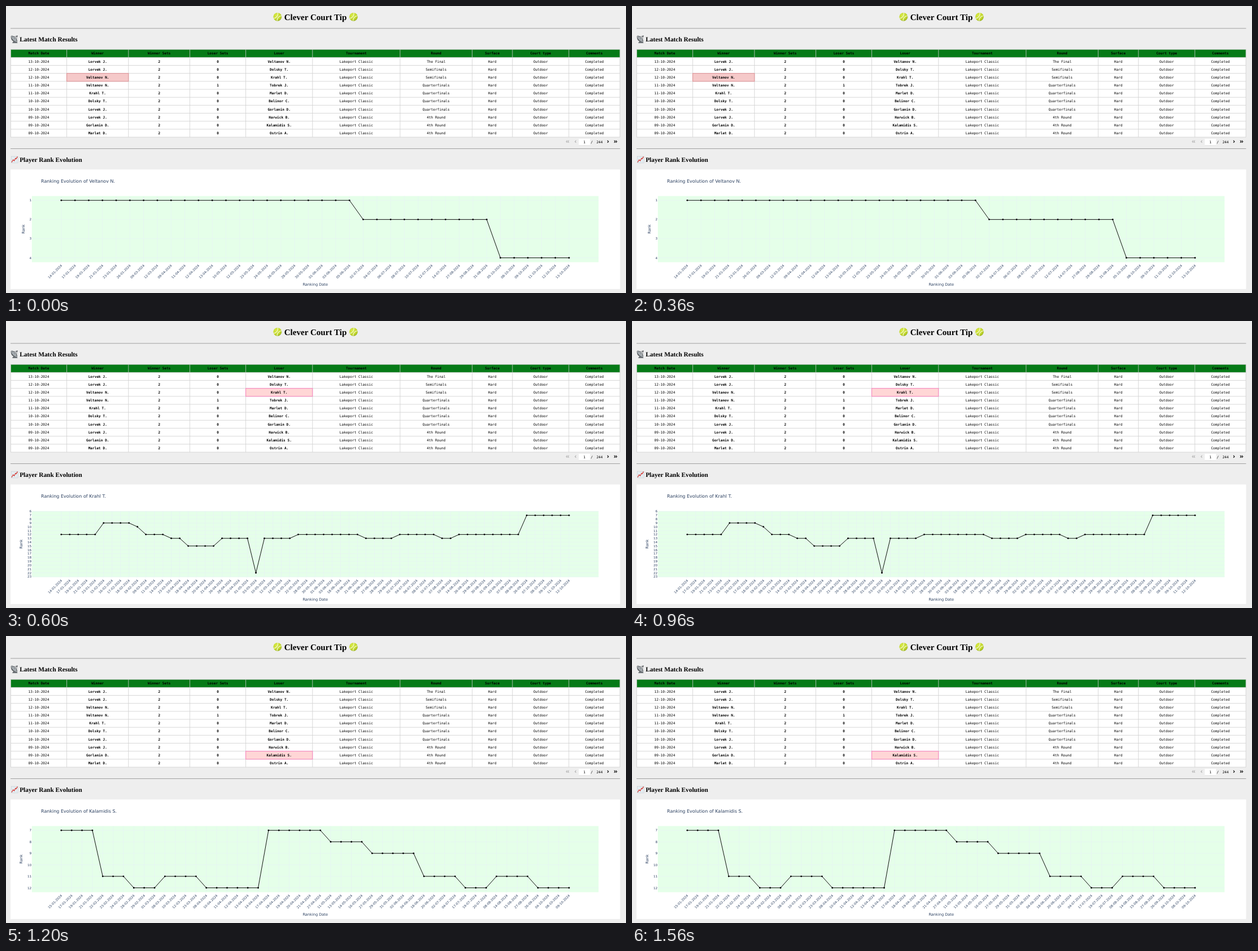
An HTML page for the animation above (1800 ms loop, 1098 px wide and 510 px high).

```html
<!DOCTYPE html>
<html lang="en">
<head>
<meta charset="utf-8">
<title>Clever Court Tip</title>
<style>
  html, body { margin: 0; width: 100%; height: 100%; overflow: hidden; background: #eee; }
  svg { display: block; width: 1098px; height: 510px; }
  text { text-rendering: geometricPrecision; white-space: pre; }
  .head { font-family: "Liberation Serif", "Times New Roman", serif; font-weight: bold; }
  .mono { font: 6.13px "DejaVu Sans Mono", Menlo, monospace; text-anchor: middle; }
  .bold { font-weight: bold; }
  .plot { font-family: "DejaVu Sans", Verdana, sans-serif; fill: #2a3f5f; }
  .view { opacity: 0; animation: show 1800ms step-end infinite; }
  .v1 { animation-delay: -1200ms; }
  .v2 { animation-delay: -600ms; }
  @keyframes show {
    0% { opacity: 1; }
    33.3333%, 100% { opacity: 0; }
  }
</style>
</head>
<body>
<svg id="stage" viewBox="0 0 1098 510" xmlns="http://www.w3.org/2000/svg">
  <defs>
    <radialGradient id="felt" cx=".4" cy=".35" r=".7">
      <stop offset="0" stop-color="#dcec4e"/>
      <stop offset=".7" stop-color="#bfd52c"/>
      <stop offset="1" stop-color="#93ab1c"/>
    </radialGradient>
    <g id="ball">
      <circle r="7.4" fill="url(#felt)"/>
      <path d="M-6.9 2.4C-2.6 2.6 1.4-1.6 .6-7.2M-.8 7.2C-1 2.6 2.4-1.6 7.1-1.8" fill="none" stroke="#f5f8dc" stroke-width="1.1"/>
    </g>
  </defs>
  <rect width="1098" height="510" fill="#eee"/>

  <use href="#ball" x="480.8" y="19.3"/>
  <use href="#ball" x="615.4" y="19.3"/>
  <text class="head" x="548" y="24.7" font-size="15.1" text-anchor="middle">Clever Court Tip</text>
  <path d="M8 39.8H1087.5M8 253.5H1087.5" stroke="#999" stroke-width=".9"/>

  <g>
    <path d="M14.5 60L11 66H20.5L17.5 60Z" fill="#6d7276"/>
    <path d="M9.2 53.2C7.6 58.6 11.2 64.4 19.6 63.6Z" fill="#4d5256"/>
    <ellipse cx="14.4" cy="58.4" rx="7.2" ry="2.9" transform="rotate(45 14.4 58.4)" fill="#a7adb1" stroke="#62676b" stroke-width=".6"/>
    <path d="M14.4 58.4L19.4 53.6M10.5 55L19.4 53.6L18.4 62" fill="none" stroke="#555a5e" stroke-width=".7"/>
    <circle cx="19.6" cy="53.5" r="1.1" fill="#3f4346"/>
  </g>
  <text class="head" x="24.2" y="63" font-size="11.33">Latest Match Results</text>

  <g>
    <rect x="9.4" y="267.2" width="11.6" height="11.6" fill="#fbfcfd" stroke="#b5bfc6" stroke-width=".6"/>
    <path d="M12.3 267.2V278.8M15.2 267.2V278.8M18.1 267.2V278.8M9.4 270.1H21M9.4 273H21M9.4 275.9H21" stroke="#a9cbd9" stroke-width=".5"/>
    <path d="M10 277.8L12.6 273.2L14.6 275L17 270.4L18.2 271.6L20.4 267.6" fill="none" stroke="#d8342c" stroke-width="1.2"/>
  </g>
  <text class="head" x="24.2" y="276.8" font-size="11.33">Player Rank Evolution</text>

  <g id="table"></g>

  <g class="mono">
    <rect x="1014.3" y="236" width="20" height="11.6" fill="#fff"/>
    <path d="M1014.3 247.6H1034.3" stroke="#d3d3d3" stroke-width=".5"/>
    <text x="1024.3" y="244.2">1</text>
    <text x="1037.4" y="243.6">/</text>
    <text x="1051.2" y="243.6">244</text>
    <g fill="none" stroke-width="1.1">
      <path d="M994.2 238.9L992.2 240.9L994.2 242.9M997 238.9L995 240.9L997 242.9M1009.7 238.9L1007.7 240.9L1009.7 242.9" stroke="#b0b0b0"/>
      <path d="M1065 238.9L1067 240.9L1065 242.9M1077 238.9L1079 240.9L1077 242.9M1079.8 238.9L1081.8 240.9L1079.8 242.9" stroke="#000"/>
    </g>
  </g>

  <rect x="8" y="290.5" width="1079.5" height="212.4" fill="#fff"/>
  <rect x="45.8" y="337.7" width="1003.6" height="117.6" fill="#e5ffe9"/>
  <text class="plot" x="547.7" y="496.8" font-size="6.61" text-anchor="middle">Ranking Date</text>
  <g id="charts"></g>
</svg>
<script>
const NS = 'http://www.w3.org/2000/svg';
const byId = id => document.getElementById(id);

function add(parent, tag, attrs, text) {
  const el = document.createElementNS(NS, tag);
  for (const k in attrs) el.setAttribute(k, attrs[k]);
  if (text !== undefined) el.textContent = text;
  parent.appendChild(el);
  return el;
}

// Match table
const cols = [8.4, 107.6, 216.9, 325.6, 424.6, 542.8, 697.9, 825.6, 896.9, 996.8, 1087.2];
const top0 = 77.2, rowH = 14.17;
const titles = ['Match Date', 'Winner', 'Winner Sets', 'Loser Sets', 'Loser',
  'Tournament', 'Round', 'Surface', 'Court type', 'Comments'];
const matches = [
  ['13', 'Lorvek J.', 0, 'Veltanov N.', 'The Final'],
  ['12', 'Lorvek J.', 0, 'Dolsky T.', 'Semifinals'],
  ['12', 'Veltanov N.', 0, 'Krahl T.', 'Semifinals'],
  ['11', 'Veltanov N.', 1, 'Tobrek J.', 'Quarterfinals'],
  ['11', 'Krahl T.', 0, 'Marlet D.', 'Quarterfinals'],
  ['10', 'Dolsky T.', 0, 'Belinor C.', 'Quarterfinals'],
  ['10', 'Lorvek J.', 0, 'Gorlanin D.', 'Quarterfinals'],
  ['09', 'Lorvek J.', 0, 'Harwick B.', '4th Round'],
  ['09', 'Gorlanin D.', 0, 'Kalamidis S.', '4th Round'],
  ['09', 'Marlet D.', 0, 'Ostrin A.', '4th Round']
];

// ranks: "rank*repeat"; dates: "month:days"
const views = [
  { player: 'Veltanov N.', row: 3, col: 1, fill: '#f5c9c9', edge: '#dc8f93', ticks: [1, 4], labelX: 33,
    ranks: '1*22 2*10 4*6',
    dates: '01:14,17,19,21,23,26 03:09,12 04:09,11,12,13 05:10,12,23,24,26,28,30 06:01,03,05 ' +
      '07:02,04,06,08,10,12,14 08:27,29,31 10:05,08,09,11,12,13' },
  { player: 'Krahl T.', row: 3, col: 4, fill: '#ffd6d6', edge: '#f77fbb', ticks: [6, 23], labelX: 29.2,
    ranks: '12*5 9*4 10*1 12*3 13*2 15*4 13*4 22*1 13*4 12*8 13*4 12*5 13*2 12*8 7*6',
    dates: '01:14,17,19,21,23 02:15,16,17,18,19 03:09,11,14,23 04:10,18,19,20,21,26,28,30 ' +
      '05:01,03,10,12,14,15,22,28,30 06:01,03,18,19,21,26,27,28,29 07:02,04,06,08,10 ' +
      '08:07,10,14,26,29,30 09:01,03,07,08,26 10:07,08,09,11,12' },
  { player: 'Kalamidis S.', row: 9, col: 4, fill: '#ffd6d6', edge: '#f77fbb', ticks: [7, 12], labelX: 29.2,
    ranks: '7*4 11*3 12*3 11*4 12*6 7*6 8*4 9*5 11*4 12*3 11*4 12*4',
    dates: '01:15,17,19,21 02:22,23,24,28,29 03:01,08,10,12,23 04:08,10,11,12,13,14,17,18,19,20,21,27 ' +
      '05:11,13,14,16,27,29,31 06:02,04,18,20 07:02,04,17,19,20 08:08,14,15,27 09:26 10:04,08,09' }
];

function drawTable(g) {
  const left = cols[0], right = cols[10], bottom = top0 + 11 * rowH;
  add(g, 'rect', { x: left, y: top0, width: right - left, height: bottom - top0, fill: '#fff' });
  add(g, 'rect', { x: left, y: top0, width: right - left, height: rowH, fill: '#067a17' });
  let lines = cols.map(x => `M${x} ${top0}V${bottom}`).join('');
  for (let r = 0; r < 12; r++) lines += `M${left} ${top0 + r * rowH}H${right}`;
  add(g, 'path', { d: lines, fill: 'none', stroke: '#cfcfcf', 'stroke-width': .8 });

  views.forEach((v, i) => add(g, 'rect', {
    class: 'view v' + i, x: cols[v.col], y: top0 + v.row * rowH,
    width: cols[v.col + 1] - cols[v.col], height: rowH,
    fill: v.fill, stroke: v.edge, 'stroke-width': 1
  }));

  const rows = matches.map(([day, winner, lost, loser, round]) =>
    [day + '-10-2024', winner, 2, lost, loser, 'Lakeport Classic', round, 'Hard', 'Outdoor', 'Completed']);
  [titles, ...rows].forEach((cells, r) => cells.forEach((cell, c) => {
    const bold = r === 0 || (c > 0 && c < 5);
    add(g, 'text', {
      class: bold ? 'mono bold' : 'mono',
      x: (cols[c] + cols[c + 1]) / 2, y: top0 + (r + .5) * rowH + 2.1
    }, cell);
  }));
}

function drawChart(parent, v, i) {
  const g = add(parent, 'g', { class: 'plot view v' + i });
  const ranks = v.ranks.split(' ').flatMap(run => {
    const [rank, n] = run.split('*').map(Number);
    return Array(n).fill(rank);
  });
  const dates = v.dates.split(' ').flatMap(group => {
    const [month, days] = group.split(':');
    return days.split(',').map(d => `${d}-${month}-2024`);
  });
  const lo = Math.min(...ranks), hi = Math.max(...ranks);
  const px = k => 97.9 + 899.2 * k / (ranks.length - 1);
  const py = rank => 345.3 + 102.2 * (rank - lo) / (hi - lo);

  add(g, 'text', { x: 62, y: 314, 'font-size': 8.03 }, 'Ranking Evolution of ' + v.player);
  add(g, 'text', {
    transform: `translate(${v.labelX} 396.5) rotate(-90)`, 'font-size': 6.61, 'text-anchor': 'middle'
  }, 'Rank');

  let grid = dates.map((d, k) => `M${px(k)} 337.7V455.3`).join('');
  for (let rank = v.ticks[0]; rank <= v.ticks[1]; rank++) {
    const y = py(rank);
    grid += `M45.8 ${y}H1049.4`;
    add(g, 'text', { x: 45.2, y: y + 2, 'font-size': 5.67, 'text-anchor': 'end' }, rank);
  }
  add(g, 'path', { d: grid, fill: 'none', stroke: '#e6eef8', 'stroke-width': .5 });

  dates.forEach((date, k) => add(g, 'text', {
    transform: `translate(${px(k)} 459.6) rotate(-45)`, y: 2.8, 'font-size': 5.67, 'text-anchor': 'end'
  }, date));

  add(g, 'polyline', {
    points: ranks.map((rank, k) => px(k) + ',' + py(rank)).join(' '),
    fill: 'none', stroke: '#000', 'stroke-width': .95
  });
  ranks.forEach((rank, k) => add(g, 'circle', { cx: px(k), cy: py(rank), r: 1.42, fill: '#000' }));
}

drawTable(byId('table'));
views.forEach((v, i) => drawChart(byId('charts'), v, i));
</script>
</body>
</html>
```
